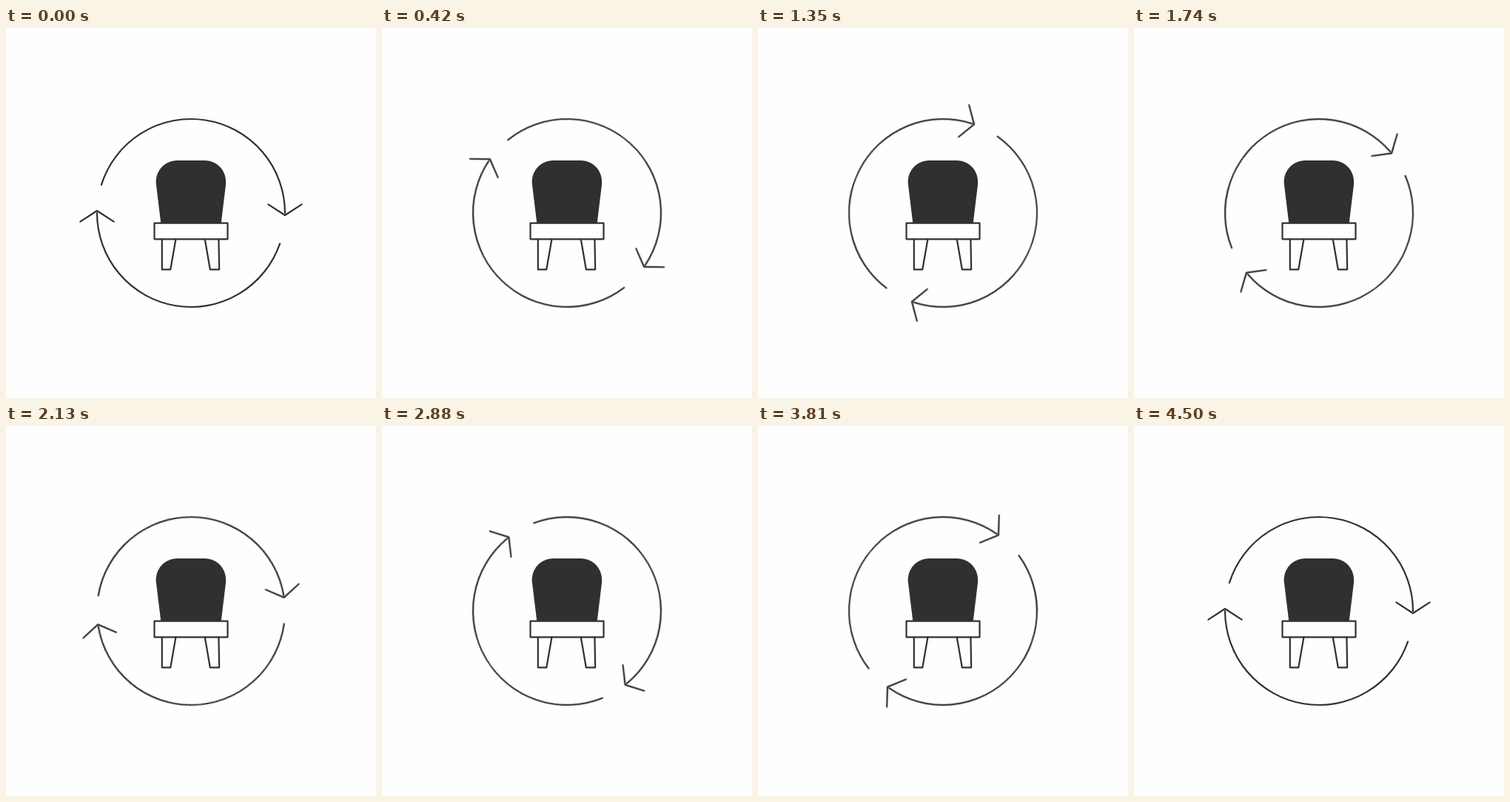
Animation, 500 px wide and 500 px high, one loop 4.53 s. Source, as an HTML page:

```html
<!DOCTYPE html>
<html lang="en">
<head>
<meta charset="utf-8">
<title>Chair renewal</title>
<style>
  html, body { margin: 0; width: 100%; height: 100%; overflow: hidden; background: #fefefe; }
  svg { display: block; width: 100vw; height: 100vh; }
  .line { fill: none; stroke: #303030; stroke-width: 2.2; stroke-linecap: round; stroke-linejoin: round; }
  .back { fill: #303030; }
  .ring {
    transform-origin: 250px 250px;
    /* small lead keeps each step clear of its boundary */
    animation: turn 4530ms -2ms infinite;
  }
  /* 150 steps of 30 ms, then one step of rest */
  @keyframes turn {
    0% { transform: rotate(0deg); animation-timing-function: steps(150, end); }
    99.33775%, 100% { transform: rotate(360deg); }
  }
</style>
</head>
<body>
<svg viewBox="0 0 500 500">
  <g class="ring line">
    <path id="top"/>
    <path id="bottom"/>
    <path d="M354.4 238.4 L377 253 L399.6 238.4"/>
    <path d="M145.6 261.6 L123 247 L100.4 261.6"/>
  </g>
  <path class="back" d="M209.3 264 L203 212 C200.8 194 214 179 231.5 179 H268.5 C286 179 299.2 194 297 212 L290.7 264 Z"/>
  <g class="line">
    <rect x="200.5" y="263.7" width="99" height="21.6"/>
    <path d="M210.8 285.5 V326.3 H222.3 L229.4 285.5"/>
    <path d="M268.8 285.5 L275.8 326.3 H288.2 L287.4 285.5"/>
  </g>
</svg>
<script>
  const C = 250, R = 127;
  const point = deg => {
    const a = deg * Math.PI / 180;
    return `${C + R * Math.cos(a)} ${C + R * Math.sin(a)}`;
  };
  const arc = (id, from, to) => document.getElementById(id).setAttribute('d',
    `M${point(from)} A${R} ${R} 0 0 1 ${point(to)}`);
  arc('top', 197.5, 360);
  arc('bottom', 19, 180);
</script>
</body>
</html>
```
